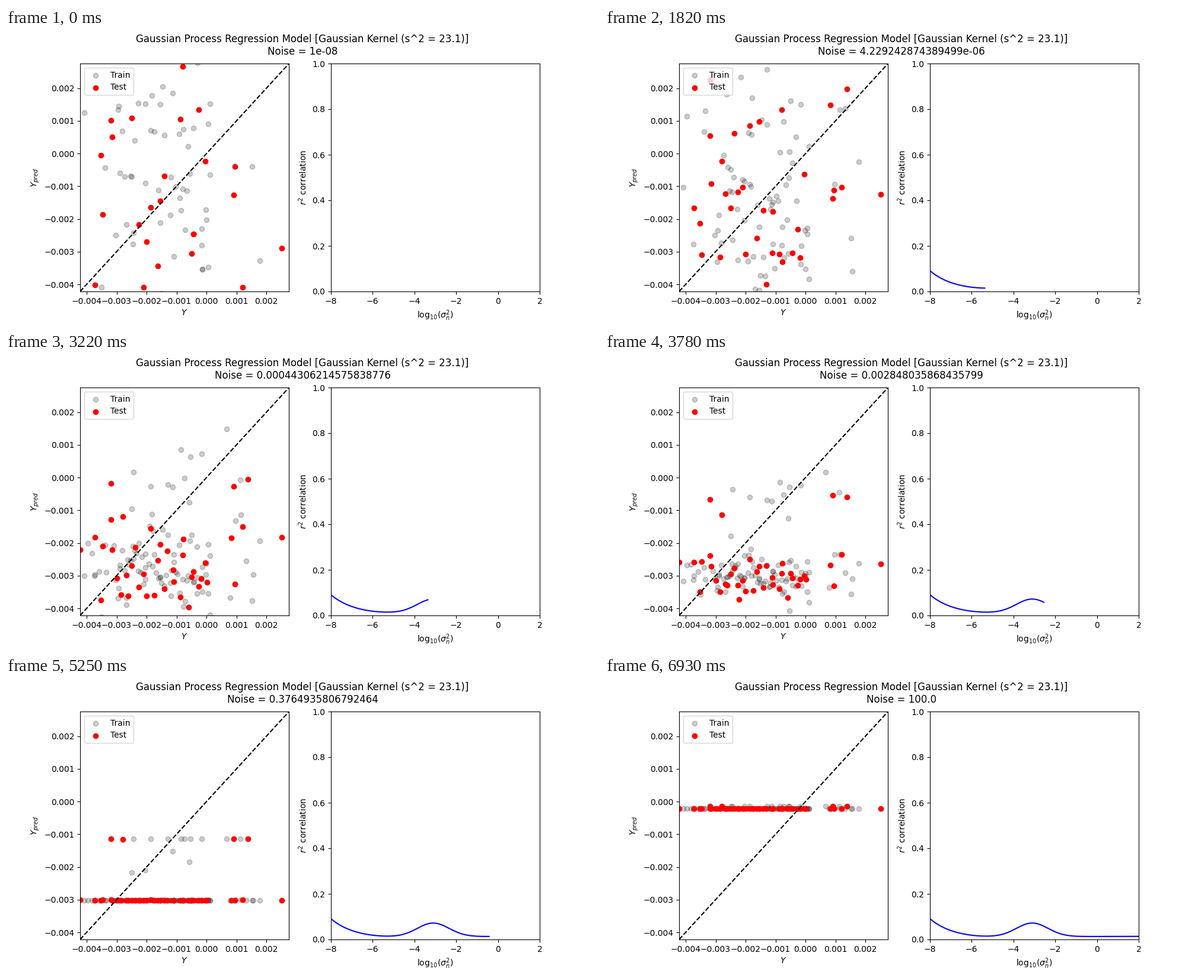
A matplotlib script that plays this animation: 1000 px wide and 500 px high, repeating every 7 s.

```python
import numpy as np
import matplotlib.pyplot as plt
from matplotlib.animation import FuncAnimation

FRAMES, INTERVAL = 100, 70
LOW, HIGH = -0.004217, 0.002753
NOISES = np.logspace(-8, 2, FRAMES)

# Each mode of the scatter fades once the noise passes its own strength.
MODE_STRENGTH = np.array([1e-7, 1e-6, 1e-5, 1e-4, 2e-3])
MODE_SIZE = np.array([2.3, 2.5, 2.2, 1.4, 0.85]) / 1000

rng = np.random.default_rng(4)


def fade(strength, noise):
    return strength / (strength + noise)


def lower_level(noise):
    return (-0.00317 * fade(7.6, noise) + 0.0006 * fade(1e-3, noise)
            + 0.0008 * fade(1e-5, noise))


def upper_level(noise):
    return (-0.00177 * fade(9, noise) + 0.00097 * fade(0.5, noise)
            + 0.0013 * fade(1e-3, noise) - 0.0005 * fade(1e-5, noise))


class Cloud:
    """Points whose predictions shrink onto two levels as the noise grows.

    Positions are in thousandths; shares place points between the levels.
    """

    def __init__(self, lower, upper, between=(), shares=()):
        self.x = np.concatenate([lower, upper, between]) / 1000
        self.share = np.concatenate([np.zeros(len(lower)), np.ones(len(upper)), shares])
        self.weights = rng.standard_normal((len(MODE_SIZE), len(self.x)))

    def at(self, noise):
        low, high = lower_level(noise), upper_level(noise)
        share = np.where(self.share > 0, 1 - (1 - self.share) * fade(5, noise), 0)
        scatter = (MODE_SIZE * fade(MODE_STRENGTH, noise)) @ self.weights
        return np.column_stack([self.x, low + share * (high - low) + scatter])


def spread(start, stop, count, jitter=0.03):
    return np.linspace(start, stop, count) + rng.normal(0, jitter, count)


train = Cloud(
    lower=np.concatenate([spread(-4.06, -3.29, 9), spread(-3.09, 0.17, 70),
                          spread(0.85, 1.74, 7)]),
    upper=[-2.44, -1.86, -1.29, -0.85, -0.74, -0.54, -0.16, 0.67, 1.12],
    between=[-2.49, -2.04, -1.13, -0.57],
    shares=[0.41, 0.46, 0.78, 0.59],
)
test = Cloud(
    lower=np.concatenate([[1000 * LOW, -3.72, -3.53, -3.47], spread(-3.19, 0.05, 30),
                          [0.83, 0.95, 1.2, 2.51]]),
    upper=[-3.19, -2.79, 0.91, 1.38],
)

log_noise = np.log10(NOISES)
u = log_noise + 8
correlation = (0.0115 + 0.0002 * u + 0.08 * np.exp(-u - 0.06 * u**3)
               + 0.0595 * np.exp(-((log_noise + 3.1) / 0.76) ** 2 / 2))

fig, (ax, ax_r) = plt.subplots(1, 2, figsize=(10, 5), dpi=100)
title = fig.suptitle("")

train_dots = ax.scatter(*train.at(NOISES[0]).T, color="k", alpha=0.2, label="Train")
test_dots = ax.scatter(*test.at(NOISES[0]).T, color="r", label="Test")
ax.plot([LOW, HIGH], [LOW, HIGH], "k--")
ticks = np.arange(-4, 3) / 1000
ax.set(xticks=ticks, yticks=ticks, xlim=(LOW, HIGH), ylim=(LOW, HIGH),
       xlabel="$Y$", ylabel="$Y_{pred}$")
ax.legend(loc="upper left")

curve, = ax_r.plot([], [], "b")
ax_r.set(xlim=(-8, 2), ylim=(0, 1), xlabel=r"log$_{10}(\sigma_n^2)$",
         ylabel="$r^2$ correlation")


def update(frame):
    noise = NOISES[frame]
    title.set_text("Gaussian Process Regression Model [Gaussian Kernel (s^2 = 23.1)]\n"
                   f"Noise = {float(noise)}")
    train_dots.set_offsets(train.at(noise))
    test_dots.set_offsets(test.at(noise))
    curve.set_data(log_noise[:frame + 1], correlation[:frame + 1])
    return title, train_dots, test_dots, curve


anim = FuncAnimation(fig, update, frames=FRAMES, interval=INTERVAL, repeat=True)
plt.show()
```
